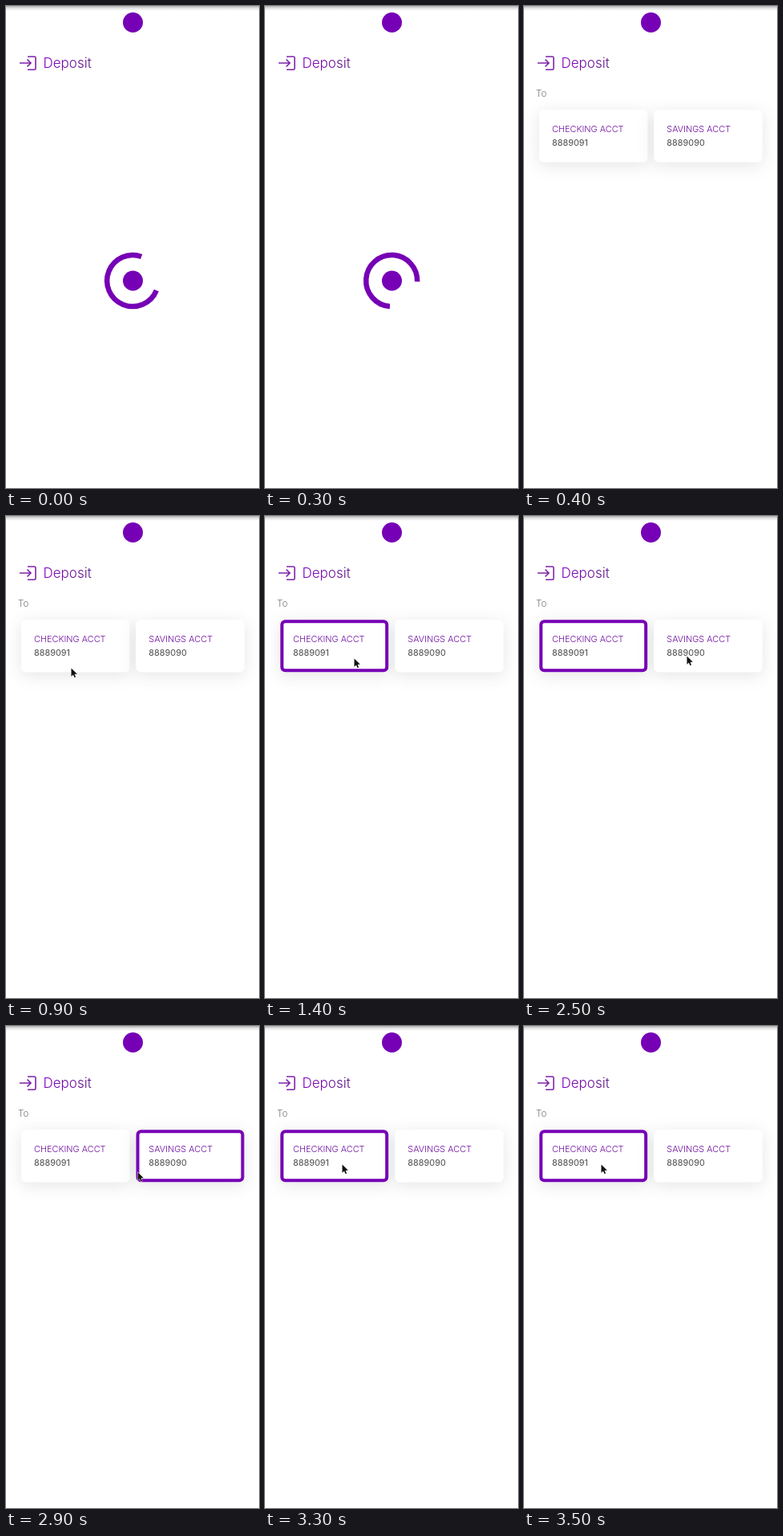
Write an HTML page that moves like this. It is 316x600 px and loops after 3.6 s.

```html
<!DOCTYPE html>
<html lang="en">
<head>
<meta charset="utf-8">
<title>Deposit</title>
<style>
  html, body { margin: 0; width: 100%; height: 100%; overflow: hidden; background: #fff; }
  svg { display: block; width: 316px; height: 600px; font-family: Inter, "Open Sans", sans-serif; font-weight: 300; }
  .card rect:first-child { fill: #fff; filter: drop-shadow(0 4px 10px rgba(0, 0, 0, .1)); }
  .border { fill: none; stroke: #7600b5; stroke-width: 4; }
  .name { fill: #6d0c9f; }
  .number { fill: #4c4c4c; font-weight: 400; }
</style>
</head>
<body>
<svg viewBox="0 0 316 600">
  <defs>
    <linearGradient id="bar" x2="0" y2="1">
      <stop stop-color="#a9a9a9"/>
      <stop offset=".4" stop-color="#dedede"/>
      <stop offset="1" stop-color="#fff"/>
    </linearGradient>
    <linearGradient id="ink">
      <stop stop-color="#8200c4"/>
      <stop offset="1" stop-color="#5f1a85"/>
    </linearGradient>
  </defs>

  <rect width="316" height="6" fill="url(#bar)"/>
  <circle cx="158.5" cy="20.5" r="12.5" fill="#7600b5"/>
  <path d="M17 71H31M26.5 66.5L31 71L26.5 75.5M27 63H35.5Q37 63 37 64.5V77.7Q37 79.2 35.5 79.2H27"
        fill="none" stroke="#7f22ab" stroke-width="1.6"/>
  <text x="46.5" y="77" font-size="17" fill="url(#ink)">Deposit</text>

  <g id="loader">
    <circle cx="158.5" cy="342" r="12.5" fill="#7600b5"/>
    <circle id="ring" cx="158.2" cy="342" r="32" fill="none" stroke="#7600b5" stroke-width="6.5"
            pathLength="360" stroke-dasharray="268 92"/>
  </g>

  <g id="accounts">
    <text x="15" y="112.5" font-size="11.5" fill="#777">To</text>
  </g>

  <path id="cursor" d="M0 0V10.2L2.4 8L4 11.6L5.6 10.9L4.1 7.3H7.4Z"
        fill="#111" stroke="#fff" stroke-width="1" paint-order="stroke"/>
</svg>
<script>
  const LOOP = 3600, STEP = 100, LOADED = 400, POINTER_IN = 800;
  const $ = id => document.getElementById(id);
  const show = (node, on) => node.setAttribute("visibility", on ? "visible" : "hidden");

  function addCard(x, name, number) {
    const card = document.createElementNS("http://www.w3.org/2000/svg", "g");
    card.setAttribute("class", "card");
    card.setAttribute("transform", `translate(${x} 129)`);
    card.setAttribute("font-size", 10.9);
    card.innerHTML = `
      <rect width="135.5" height="65.5" rx="6"/>
      <rect class="border" x="2.2" y="2.2" width="131" height="61" rx="4"/>
      <text class="name" x="16" y="28.3">${name}</text>
      <text class="number" x="16" y="45.2">${number}</text>`;
    $("accounts").append(card);
    return card.querySelector(".border");
  }

  const checking = addCard(19, "CHECKING ACCT", "8889091");
  const savings = addCard(162.3, "SAVINGS ACCT", "8889090");

  // Pointer route: time, x, y
  const route = [
    [800, 16, 190], [900, 81.5, 189.5], [1100, 103, 181], [1300, 111.5, 177.5],
    [1800, 111.5, 177.5], [2100, 160, 178], [2400, 203.5, 174.5],
    [2600, 203.5, 174.5], [2900, 164.5, 182], [3200, 96.5, 172.5], [3600, 96.5, 172.5]
  ];

  function pointerAt(t) {
    const i = Math.max(1, route.findIndex(p => p[0] >= t));
    const [t0, x0, y0] = route[i - 1], [t1, x1, y1] = route[i];
    const k = Math.max(0, (t - t0) / (t1 - t0));
    return [x0 + (x1 - x0) * k, y0 + (y1 - y0) * k];
  }

  function draw(time) {
    const t = Math.floor(time % LOOP / STEP) * STEP;
    const loaded = t >= LOADED;
    const savingsOn = t >= 2600 && t < 3300;

    show($("loader"), !loaded);
    show($("accounts"), loaded);
    show(savings, loaded && savingsOn);
    show(checking, t >= 1400 && !savingsOn);

    const turn = 22 + Math.max(0, t - 100) * 0.36;
    $("ring").setAttribute("transform", `rotate(${turn} 158.2 342)`);

    show($("cursor"), t >= POINTER_IN);
    $("cursor").setAttribute("transform", `translate(${pointerAt(t)})`);
  }

  const start = performance.now();
  function tick() {
    draw(performance.now() - start);
    requestAnimationFrame(tick);
  }
  tick();
</script>
</body>
</html>
```
